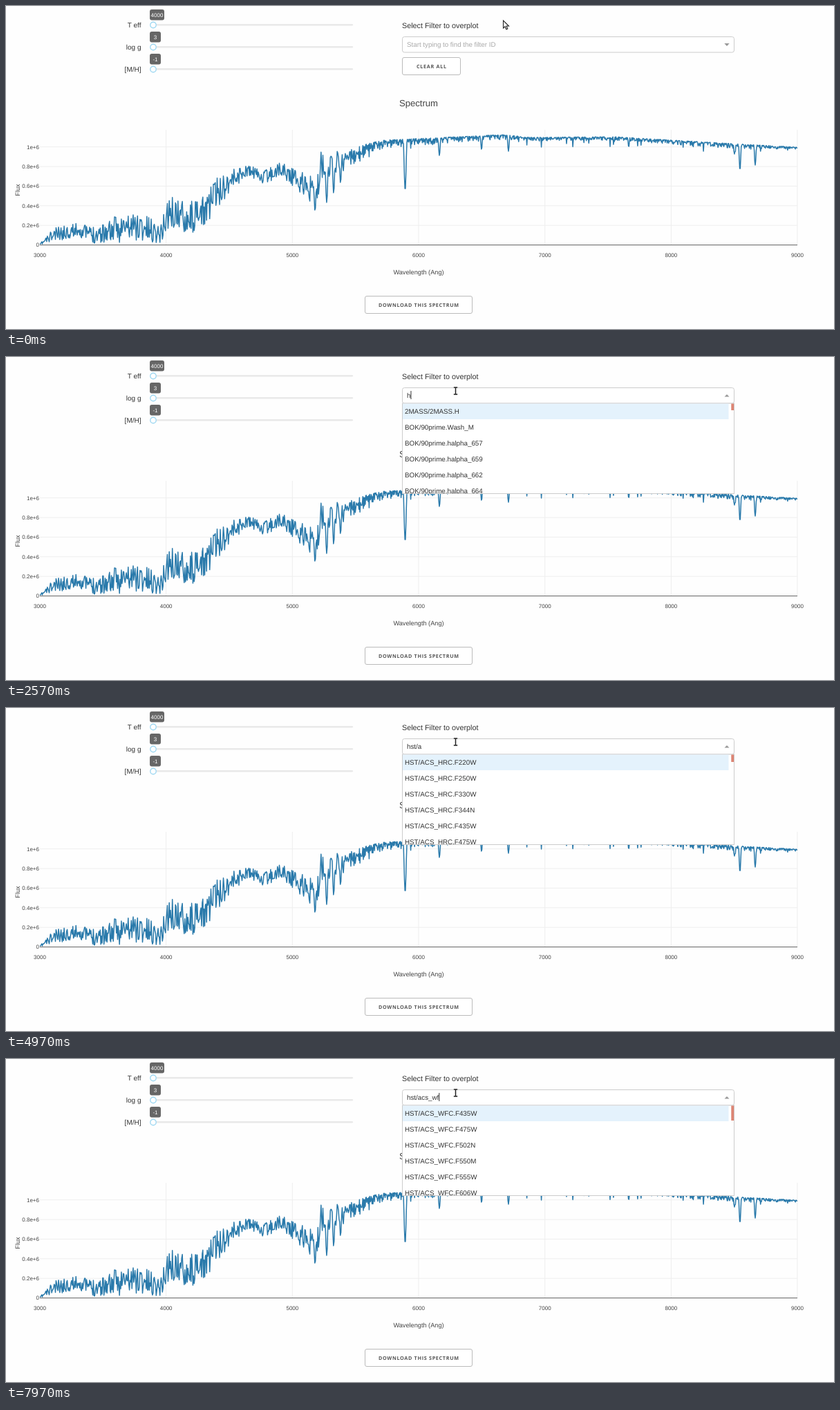
An HTML page that plays this animation: 1198 px wide and 467 px high, repeating every 8000 ms.

```html
<!DOCTYPE html>
<html lang="en">
<head>
<meta charset="utf-8">
<title>Spectrum viewer</title>
<style>
html, body { margin: 0; width: 100%; height: 100%; overflow: hidden; background: #fefefe; }
svg { display: block; font-family: "Liberation Sans", Arial, sans-serif; text-rendering: geometricPrecision; }
.button { font: 700 7.2px "Open Sans", sans-serif; letter-spacing: .7px; }
</style>
</head>
<body>
<svg id="stage" width="1198" height="467" viewBox="0 0 1198 467"></svg>
<script>
const stage = document.getElementById('stage');

function add(tag, attrs, parent = stage, content = '') {
  const el = document.createElementNS('http://www.w3.org/2000/svg', tag);
  for (const key in attrs) el.setAttribute(key, attrs[key]);
  el.textContent = content;
  return parent.appendChild(el);
}
const text = (content, x, y, size, attrs = {}, parent = stage) =>
  add('text', { x, y, 'font-size': size, fill: '#333', ...attrs }, parent, content);
const rect = (x, y, width, height, fill, attrs = {}, parent = stage) =>
  add('rect', { x, y, width, height, fill, ...attrs }, parent);
const path = (d, attrs, parent = stage) => add('path', { d, ...attrs }, parent);
const show = (el, on) => el.setAttribute('visibility', on ? 'visible' : 'hidden');
const middle = { 'text-anchor': 'middle' }, end = { 'text-anchor': 'end' };

// Sliders
[['T eff', '4000', 21], ['log g', '3', 16], ['[M/H]', '-1', 16]].forEach(([label, value, width], i) => {
  const y = 27.5 + 32 * i;
  text(label, 195.5, y + 3.5, 10, end);
  rect(209, y - 1.5, 293, 2.6, '#e9e9e9', { rx: 1.3 });
  add('circle', { cx: 213, cy: y, r: 4.2, fill: '#fff', stroke: '#9fd8f2', 'stroke-width': 1.4 });
  rect(208, y - 22.5, width, 15.5, '#666', { rx: 3 });
  text(value, 208 + width / 2, y - 12, 8, { ...middle, fill: '#fff' });
});

// Buttons
function button(label, x, y, width) {
  rect(x, y, width, 25, '#fff', { rx: 2.5, stroke: '#bbb' });
  text(label, x + width / 2 + .35, y + 15.5, 7.2, { ...middle, class: 'button', fill: '#555' });
}
button('CLEAR ALL', 573.5, 74.5, 84);
button('DOWNLOAD THIS SPECTRUM', 519.5, 419.5, 155);

// Chart axes
text('Spectrum', 597, 145, 13.1, { ...middle, fill: '#444' });
for (let i = 0; i < 7; i++) {
  const x = 49 + i * 182.67;
  if (i) path(`M${x} 179V345`, { stroke: '#eee' });
  text(3000 + i * 1000, x, 362.8, 8, { ...middle, fill: '#444' });
}
['0', '0.2e+6', '0.4e+6', '0.6e+6', '0.8e+6', '1e+6'].forEach((label, i) => {
  const y = 345.5 - i * 28.35;
  path(`M49 ${y}H1145`, { stroke: i ? '#eee' : '#666' });
  text(label, 48, y + 2.9, 8, { ...end, fill: '#444' });
});
text('Wavelength (Ang)', 597, 388, 9.2, { ...middle, fill: '#444' });
text('Flux', 0, 0, 9.2, { ...middle, fill: '#444', transform: 'translate(19.5 266) rotate(-90)' });

// Spectrum: x, upper edge and depth of the noisy band at its turning points
const band = [
  [49, 344, 1], [68, 321, 22], [103, 314, 18], [125, 318, 25], [169, 300, 42], [191, 296, 46],
  [224, 316, 26], [234, 274, 52], [280, 284, 44], [293, 258, 54], [323, 234, 36], [350, 230, 16],
  [374, 238, 20], [398, 225, 20], [450, 250, 43], [456, 206, 46], [500, 205, 30], [545, 194, 12],
  [718, 186, 7], [760, 190, 5], [880, 189, 5], [1050, 199, 7], [1145, 204, 3]
];
// The deepest absorption lines: x, y
const lines = [
  [447, 295], [464, 284], [474, 270], [484, 255], [577.5, 264], [627, 216],
  [688, 207], [727, 210], [901, 203], [1054, 214], [1062, 235], [1084, 230]
];
let seed = 11;
const random = () => (seed = seed * 16807 % 2147483647) / 2147483647;

function fluxAt(x) {
  const i = Math.max(1, band.findIndex(p => p[0] >= x));
  const [x0, top0, depth0] = band[i - 1], [x1, top1, depth1] = band[i];
  const k = (x - x0) / (x1 - x0);
  let y = top0 + (top1 - top0) * k;
  y += (depth0 + (depth1 - depth0) * k) * random() ** (x > 510 ? 2 : 1);
  if (x > 510 && random() < .05) y += 12 * random() ** 2;
  for (const [lineX, lineY] of lines) {
    const reach = Math.min(1, 1.3 - Math.abs(x - lineX) / (1 + Math.max(0, lineY - y) / 80));
    if (reach > 0) y = Math.max(y, y + (lineY - y) * reach);
  }
  return y;
}
let curve = '';
for (let x = 49; x <= 1145; x += x < 510 ? .9 : .7) curve += `${curve ? 'L' : 'M'}${x.toFixed(1)} ${fluxAt(x).toFixed(1)}`;
path(curve, { fill: 'none', stroke: '#2a7aab', 'stroke-width': 1.5, 'stroke-linejoin': 'round' });

// Filter selector
text('Select Filter to overplot', 573, 32, 10.8);
rect(573.5, 44.5, 480, 22.5, '#fff', { rx: 3, stroke: '#ccc' });
const placeholder = text('Start typing to find the filter ID', 580, 58.5, 9.75, { fill: '#aaa' });
const typed = text('', 580, 58.5, 9.8);
const arrow = path('', { fill: '#999' });
const caret = rect(580, 49, 1, 12, '#333');

const menu = add('g', {});
rect(573.5, 67, 480, 130.5, '#fff', { stroke: '#ccc' }, menu);
rect(574, 67.5, 471.5, 22.5, '#e4f2fc', {}, menu);
const thumb = rect(1049.3, 67.5, 3.8, 9.5, '#dc8473', {}, menu);
add('rect', { x: 574, y: 67, width: 479, height: 130 }, add('clipPath', { id: 'menuClip' }));
const list = add('g', { 'clip-path': 'url(#menuClip)' }, menu);
const options = Array.from({ length: 6 }, (_, i) => text('', 577, 82.3 + 22.85 * i, 9.8, {}, list));

const prefixed = (prefix, names) => names.split(' ').map(name => prefix + name);
const all = prefixed('', '2MASS/2MASS.H 2MASS/2MASS.J 2MASS/2MASS.Ks AAO/AAO.aao1 AAO/AAO.aao14 AAO/AAO.aao2');
const withH = ['2MASS/2MASS.H', ...prefixed('BOK/90prime.', 'Wash_M halpha_657 halpha_659 halpha_662 halpha_664')];
const hrc = prefixed('HST/ACS_HRC.', 'F220W F250W F330W F344N F435W F475W');
const wfc = prefixed('HST/ACS_WFC.', 'F435W F475W F502N F550M F555W F606W');

// Matching filters and scrollbar thumb height for the typed text
function search(value) {
  if (value.includes('w')) return [wfc, 21.5];
  if (value.startsWith('hst')) return [hrc, value.includes('a') ? 10.5 : 9.5];
  return [value ? withH : all, 9.5];
}

const openTime = 1300, blink = 1200;
const query = 'hst/acs_wf';
const keyTimes = [2570, 2670, 2930, 3570, 4730, 5070, 5530, 6830, 7630, 7970];

// Mouse pointers
const pointer = path('M0 0V11L2.5 8.7 4.4 12.8 6.3 12 4.5 8H8Z', { fill: '#fff', stroke: '#222', 'stroke-width': 1.1 });
const beam = add('g', {});
for (const [stroke, width] of [['#fff', 3], ['#222', 1.5]])
  path('M647.8 44H653.2M650.5 44V54M647.8 54H653.2', { stroke, 'stroke-width': width }, beam);

function draw(time) {
  const open = time >= openTime;
  const count = keyTimes.filter(t => t <= time).length;
  const value = query.slice(0, count);
  const [matches, thumbHeight] = search(value);

  // The caret goes out on each blink until the next key
  const lastBlink = time - (time - keyTimes[0]) % blink;
  show(caret, open && (!count || keyTimes[count - 1] >= lastBlink));
  typed.textContent = value;
  caret.setAttribute('x', 580 + (value ? typed.getComputedTextLength() : 0));

  const step = time < 600 ? 0 : Math.min(1, (Math.floor((time - 600) / 80) + 1) / 6);
  pointer.setAttribute('transform', `translate(${719.5 - 69.5 * step} ${21 + 27 * step})`);
  show(pointer, !open);
  show(beam, open);
  show(menu, open);
  show(placeholder, !value);
  arrow.setAttribute('d', open ? 'M1039.5 57.5H1046.5L1043 54Z' : 'M1039.3 54H1046.7L1043 58Z');
  thumb.setAttribute('height', thumbHeight);
  options.forEach((option, i) => option.textContent = matches[i]);
}

const start = performance.now();
function tick() {
  draw((performance.now() - start) % 8000);
  requestAnimationFrame(tick);
}
tick();
</script>
</body>
</html>
```
